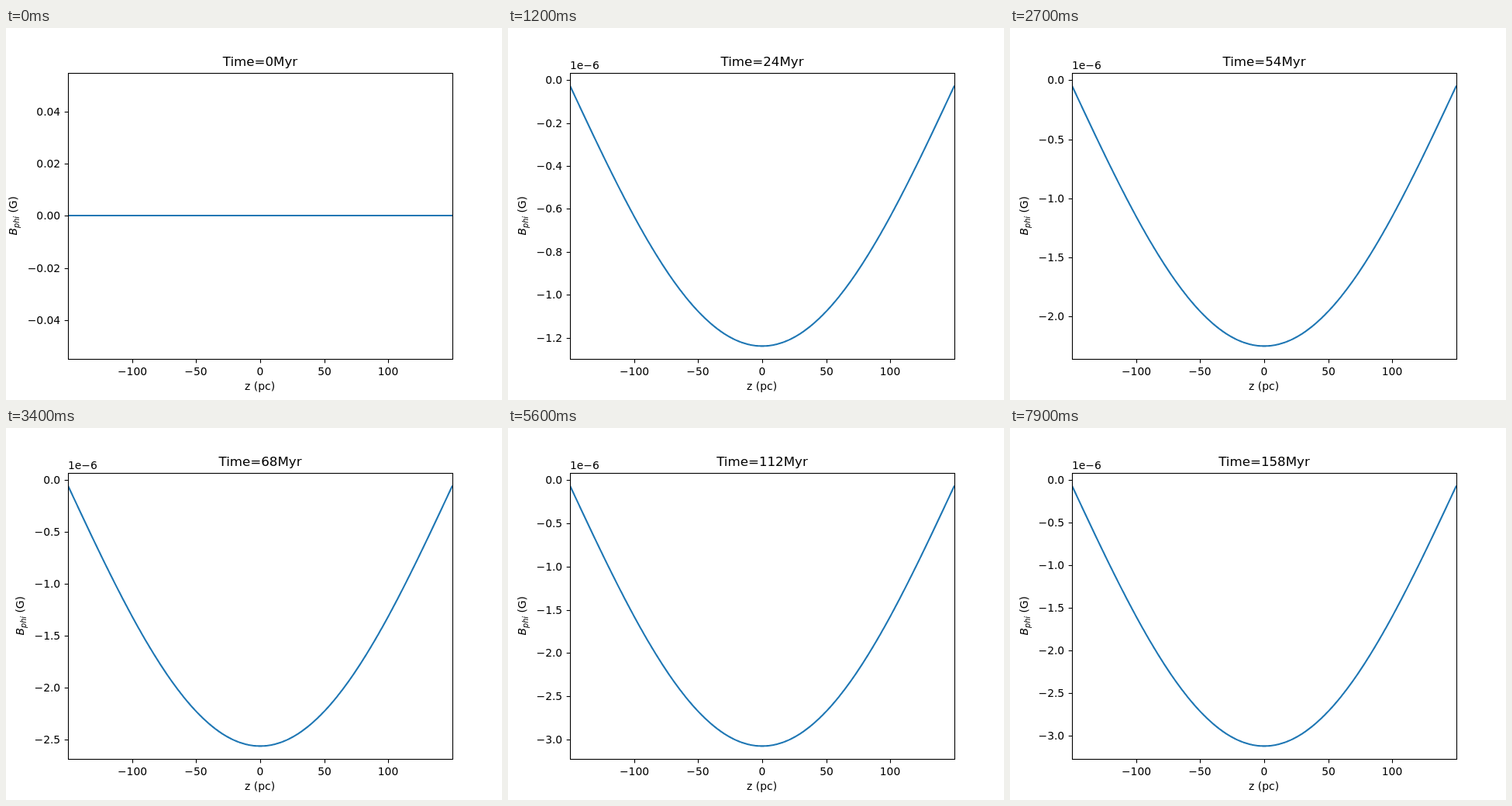
Recreate the animation shown at these times as an HTML page with a canvas. Size 640 px wide and 480 px high, loop 8 s.

```html
<!DOCTYPE html>
<html lang="en">
<head>
<meta charset="utf-8">
<title>Field profile over time</title>
<style>
  html, body { margin: 0; width: 100%; height: 100%; overflow: hidden; background: #fff; }
  canvas { display: block; width: 640px; height: 480px; }
</style>
</head>
<body>
<canvas id="plot" width="640" height="480"></canvas>
<script>
const ctx = document.getElementById('plot').getContext('2d');
const LEFT = 80, RIGHT = 576, TOP = 57.6, BOTTOM = 427.2;
const FAMILY = '"DejaVu Sans", sans-serif';
const SIZE = 10 * 100 / 72, TITLE_SIZE = 12 * 100 / 72;
const TICK = 4.86, TICK_PAD = 9.72;
const FRAME_MS = 100, FRAMES = 80, MYR_PER_FRAME = 2;

const snap = v => Math.floor(v + 0.5) + 0.5;
const xOf = z => LEFT + (z + 150) / 300 * (RIGHT - LEFT);

// Shape across the disc, and growth followed by decay (in 1e-6 G)
const profile = z => Math.cos(Math.PI * z / 304);
const amplitude = myr => 0.06133 * myr * Math.exp(-0.00717 * myr);

function viewRange(amp) {
  if (amp === 0) return [-0.055, 0.055];
  const low = -amp, high = -amp * profile(150), pad = 0.05 * (high - low);
  return [low - pad, high + pad];
}

// Smallest round step giving at most nine intervals
function tickStep(span) {
  const raw = span / 9;
  const scale = 10 ** Math.floor(Math.log10(raw));
  return [1, 2, 2.5, 5, 10].find(s => s * scale >= raw) * scale;
}

function decimals(v) {
  let d = 0;
  while (d < 3 && Math.abs(v * 10 ** d - Math.round(v * 10 ** d)) > 1e-3) d++;
  return d;
}

const signed = (v, d) => (v < 0 ? '\u2212' : '') + Math.abs(v).toFixed(d);

function text(str, x, y, align = 'left', size = SIZE, style = '') {
  ctx.font = `${style} ${size}px ${FAMILY}`;
  ctx.textAlign = align;
  ctx.fillText(str, x, y);
  return ctx.measureText(str).width;
}

function line(x1, y1, x2, y2) {
  ctx.beginPath();
  ctx.moveTo(x1, y1);
  ctx.lineTo(x2, y2);
  ctx.stroke();
}

function drawCurve(amp, yOf) {
  ctx.save();
  ctx.beginPath();
  ctx.rect(LEFT, TOP, RIGHT - LEFT, BOTTOM - TOP);
  ctx.clip();
  ctx.strokeStyle = '#1f77b4';
  ctx.lineWidth = 2.083;
  ctx.lineJoin = 'round';
  if (amp === 0) {
    line(LEFT, 242, RIGHT, 242);
  } else {
    ctx.beginPath();
    for (let z = -150; z <= 150; z++) ctx.lineTo(xOf(z), yOf(-amp * profile(z)));
    ctx.stroke();
  }
  ctx.restore();
}

function drawXAxis() {
  for (let z = -100; z <= 100; z += 50) {
    const x = snap(xOf(z));
    line(x, 427.5, x, 427.5 + TICK);
    text(signed(z, 0), x - 0.5, 448, 'center');
  }
  text('z (pc)', 327.6, 467, 'center');
}

// Returns the left edge of the widest label
function drawYAxis(amp, low, high, yOf) {
  const step = tickStep(high - low);
  const first = Math.floor(low / step);
  const power = amp ? Math.floor(Math.log10(-first * step) + 1e-9) : 0;
  const unit = 10 ** power;
  const places = decimals(step / unit);
  let widest = 0;
  for (let i = first; i * step <= high; i++) {
    const v = i * step;
    if (v < low) continue;
    const y = yOf(v);
    line(LEFT + 0.5, snap(y), LEFT + 0.5 - TICK, snap(y));
    widest = Math.max(widest, text(signed(v / unit, places), 70.2, Math.round(y + 5), 'right'));
  }
  if (amp) text('1e\u2212' + (6 - power), LEFT, 53);
  return 70.2 - widest;
}

function drawYLabel(x) {
  ctx.save();
  ctx.translate(Math.round(x), 267.5);
  ctx.rotate(-Math.PI / 2);
  let at = text('B', 0, 0, 'left', SIZE, 'italic');
  at += text('phi', at, 3, 'left', SIZE * 0.7, 'italic');
  text(' (G)', at, 0);
  ctx.restore();
}

function draw(myr) {
  const amp = amplitude(myr);
  const [low, high] = viewRange(amp);
  const yOf = v => BOTTOM - (v - low) / (high - low) * (BOTTOM - TOP);

  ctx.fillStyle = '#fff';
  ctx.fillRect(0, 0, 640, 480);
  drawCurve(amp, yOf);

  ctx.fillStyle = ctx.strokeStyle = '#000';
  ctx.lineWidth = 1.11;
  drawXAxis();
  const edge = drawYAxis(amp, low, high, yOf);
  ctx.strokeRect(80.5, 58.5, 496, 369);
  drawYLabel(edge - 13.6);
  text(`Time=${myr}Myr`, 328, 49, 'center', TITLE_SIZE);
}

const start = performance.now();
function tick() {
  const elapsed = performance.now() - start;
  draw(Math.floor(elapsed / FRAME_MS) % FRAMES * MYR_PER_FRAME);
  requestAnimationFrame(tick);
}
tick();
</script>
</body>
</html>
```
